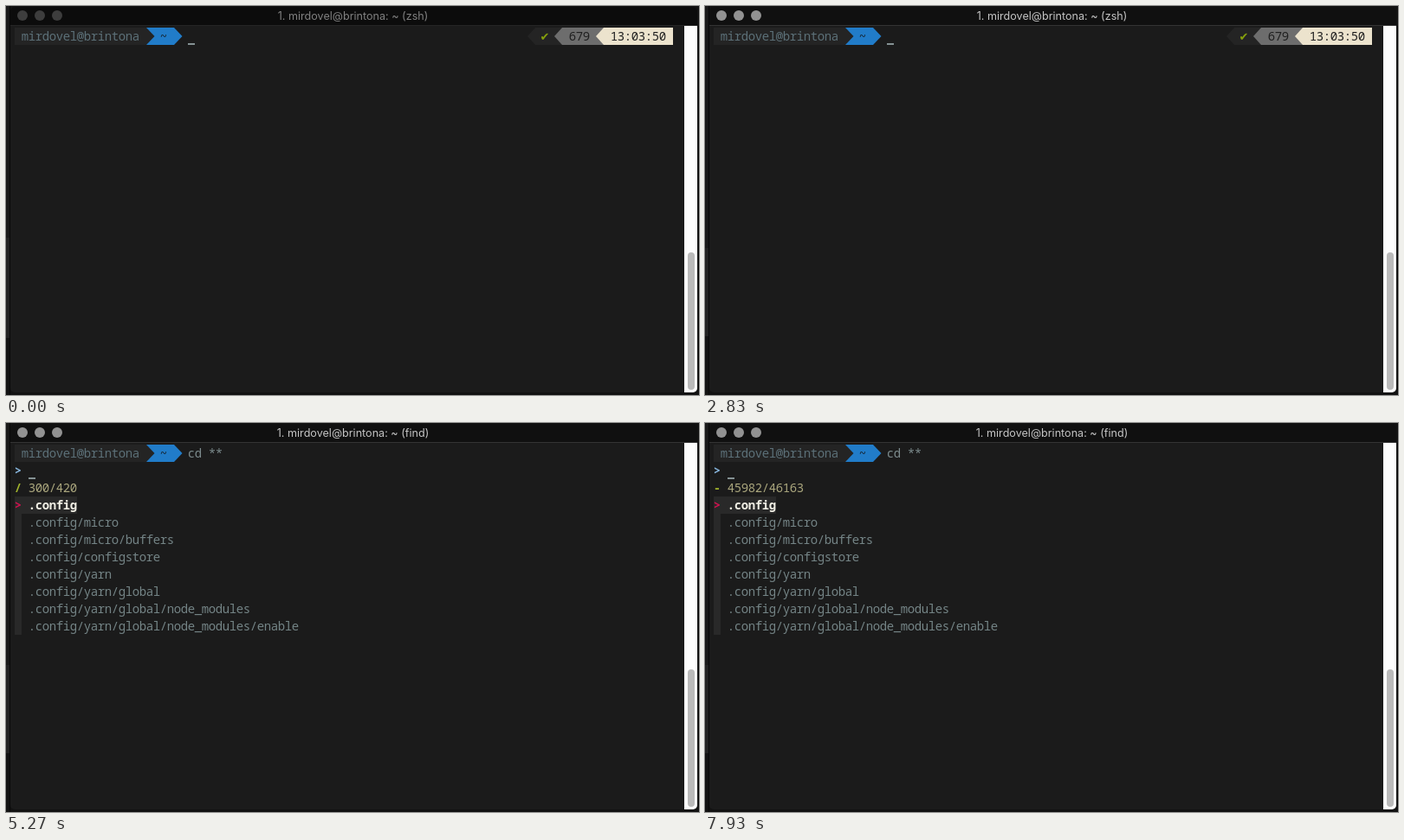
Animation of 800 by 450 pixels, one loop 8 s. Source, as an HTML page with a canvas:

```html
<!DOCTYPE html>
<html lang="en">
<head>
<meta charset="utf-8">
<title>Terminal</title>
<style>
html, body { margin: 0; width: 100%; height: 100%; overflow: hidden; background: #141414; }
canvas { display: block; width: 800px; height: 450px; }
</style>
</head>
<body>
<canvas id="stage" width="800" height="450"></canvas>
<script>
const ctx = document.getElementById('stage').getContext('2d');
const LOOP = 8000;
const FOCUS = 2680, FINDER = 4600, RENAME = 5100, RESULTS = 5200;
const SPIN_START = 4635, SPIN_STEP = 200;
const CELL = 8, ROW = 20, LEFT = 10, TOP = 25;

const USER = 'mirdovel@brintona';
const COMMAND = 'cd **';
const KEY_TIMES = [3500, 3630, 3760, 4020, 4170];
const PATHS = ['', '/micro', '/micro/buffers', '/configstore', '/yarn', '/yarn/global',
  '/yarn/global/node_modules', '/yarn/global/node_modules/enable'];
// time, matched, total
const COUNTS = [
  [RESULTS, 300, 420], [6000, 11513, 11935], [7000, 29897, 32508], [7900, 45982, 46163]
];

function rect(x, y, w, h, color) {
  ctx.fillStyle = color;
  ctx.fillRect(x, y, w, h);
}

function poly(color, ...points) {
  ctx.fillStyle = color;
  ctx.beginPath();
  for (const [x, y] of points) ctx.lineTo(x, y);
  ctx.fill();
}

function rounded(x, y, w, h, radii, color) {
  ctx.fillStyle = color;
  ctx.beginPath();
  ctx.roundRect(x, y, w, h, radii);
  ctx.fill();
}

// Terminal text sits on a fixed character grid.
function print(text, col, row, color, weight = 400) {
  ctx.font = weight + ' 14px "Noto Sans Mono", "DejaVu Sans Mono", monospace';
  ctx.textAlign = 'center';
  ctx.fillStyle = color;
  [...text].forEach((ch, i) =>
    ctx.fillText(ch, LEFT + (col + i + 0.5) * CELL, TOP + row * ROW + 15));
}

function cursor(col, row) {
  rect(LEFT + col * CELL, TOP + row * ROW + 18, CELL, 2, '#859294');
}

function drawWindow(t) {
  const active = t >= FOCUS;
  rect(0, 0, 800, 450, '#121212');
  rect(0, 0, 4, active ? 280 : 268, '#191919');
  rect(0, active ? 280 : 268, 4, active ? 102 : 116, '#222222');
  rect(4, 0, 1, 450, '#080808');
  rounded(5, 1, 793, 446, 5, '#1b1b1b');
  rounded(5, 1, 793, 21, [5, 5, 0, 0], active ? '#101010' : '#0c0c0c');
  rect(5, 22, 793, 1, active ? '#343434' : '#252525');

  for (const x of [19, 39, 59]) {
    ctx.fillStyle = active ? '#929292' : '#3d3d3d';
    ctx.beginPath();
    ctx.arc(x, 11, 6, 0, Math.PI * 2);
    ctx.fill();
  }
  ctx.font = '12.6px Inter, sans-serif';
  ctx.textAlign = 'center';
  ctx.fillStyle = active ? '#c4c4c4' : '#808080';
  ctx.fillText(`1. ${USER}: ~ (${t < RENAME ? 'zsh' : 'find'})`, 400.5, 16);

  rounded(783, 23, 15, 424, [0, 0, 5, 0], '#fdfdfd');
  rounded(787, 285, 8, 159, 4, '#bababa');
}

function drawPrompt() {
  rect(10, 25, 152, 20, '#242424');
  poly('#217cc9', [162, 25], [194, 25], [203.5, 35], [194, 45], [162, 45]);
  poly('#242424', [161, 25], [162, 25], [171.5, 35], [162, 45], [161, 45]);
  print(USER, 1, 0, '#5c7078');
  print('~', 21, 0, '#16242f');
}

function drawStatus() {
  poly('#242424', [602, 35], [611, 25], [643, 25], [643, 45], [611, 45]);
  poly('#6d6d6d', [633, 35], [642, 25], [691, 25], [691, 45], [642, 45]);
  poly('#ece3cd', [681, 35], [690, 25], [770, 25], [770, 45], [690, 45]);
  ctx.font = '13px "DejaVu Sans", sans-serif';
  ctx.textAlign = 'center';
  ctx.fillStyle = '#86a00c';
  ctx.fillText('✔', 622, 40);
  print('679', 80, 0, '#202020');
  print('13:03:50', 86, 0, '#202020');
}

function countText(t) {
  if (t < RESULTS) return '0/0';
  const tick = Math.floor(t / 100) * 100;
  let i = 0;
  while (i < COUNTS.length - 2 && tick >= COUNTS[i + 1][0]) i++;
  const a = COUNTS[i], b = COUNTS[i + 1];
  const p = (tick - a[0]) / (b[0] - a[0]);
  const mix = k => Math.round(a[k] + (b[k] - a[k]) * p);
  return mix(1) + '/' + mix(2);
}

function drawFinder(t) {
  const step = Math.max(0, Math.floor((t - SPIN_START) / SPIN_STEP));
  print('>', 0, 1, '#87b5dc', 600);
  cursor(2, 1);
  print('-\\|/'[step % 4], 0, 2, '#a0b32c', 600);
  print(countText(t), 2, 2, '#aaa67d', 500);
  if (t < RESULTS) return;

  rect(10, 85, 8, 160, '#292929');
  rect(10, 85, 72, 20, '#292929');
  print('>', 0, 3, '#d0124f', 600);
  PATHS.forEach((path, i) =>
    print('.config' + path, 2, 3 + i, i ? '#748486' : '#f0eee4', i ? 400 : 600));
}

function draw(t) {
  drawWindow(t);
  drawPrompt();
  const typed = KEY_TIMES.filter(k => t >= k).length;
  print(COMMAND.slice(0, typed), 25, 0, '#7c8b8d');
  if (t < FINDER) {
    drawStatus();
    cursor(25 + typed, 0);
  } else {
    drawFinder(t);
  }
}

function frame() {
  draw(performance.now() % LOOP);
  requestAnimationFrame(frame);
}
frame();
</script>
</body>
</html>
```
